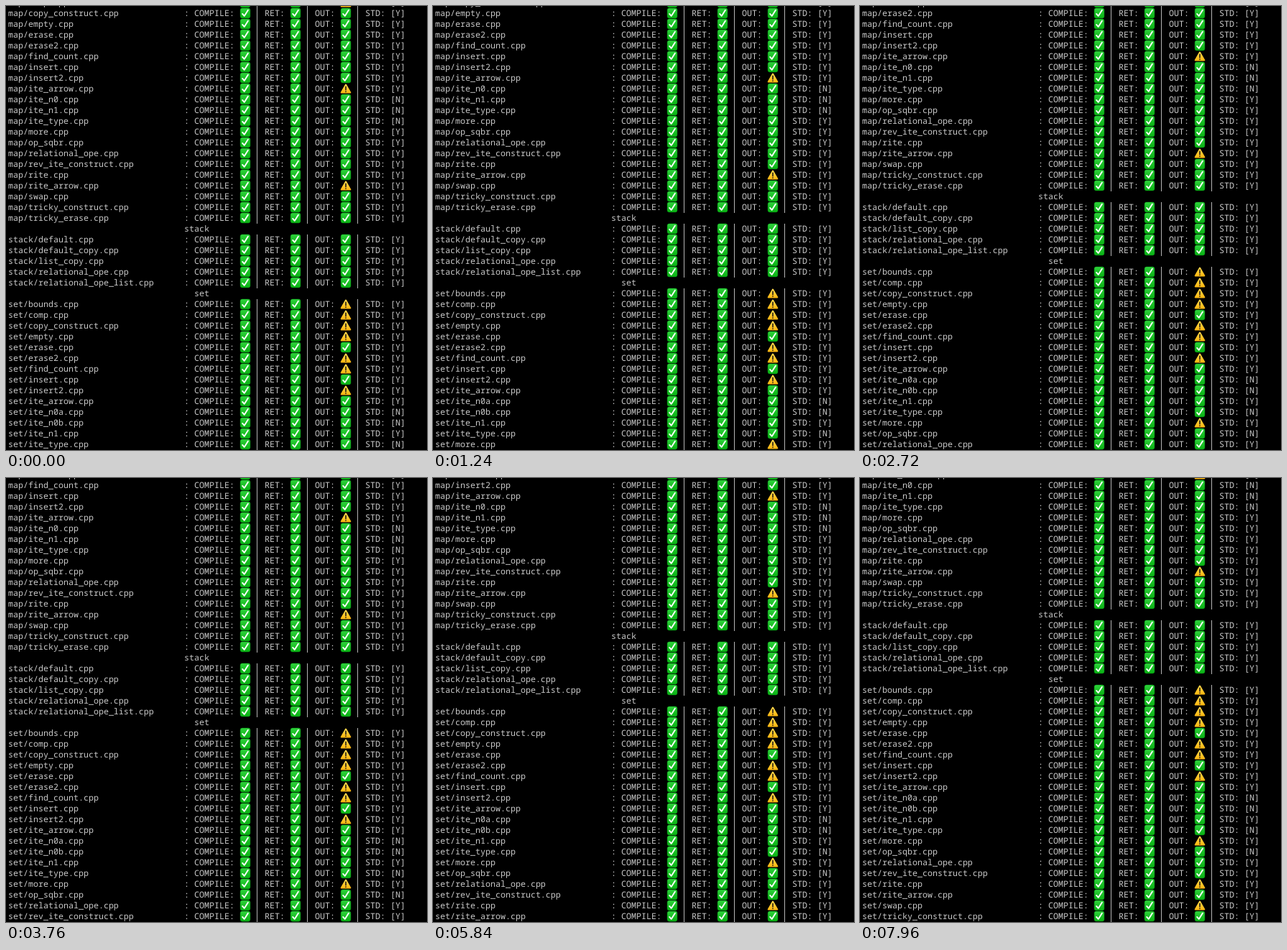
These frames come from a looping animation (586 px wide and 618 px high, 8 s). An HTML page:

```html
<!DOCTYPE html>
<html lang="en">
<head>
<meta charset="utf-8">
<title>Test run</title>
<style>
html, body { margin: 0; width: 100%; height: 100%; overflow: hidden; background: #000; }
svg { display: block; }
text {
  font: 11.667px "Noto Sans Mono", "DejaVu Sans Mono", monospace;
  fill: #c9c9c9;
  text-rendering: geometricPrecision;
}
</style>
</head>
<body>
<svg width="586" height="618" viewBox="0 0 586 618">
  <defs>
    <linearGradient id="green" x2="0" y2="1">
      <stop offset="0" stop-color="#2fd23c"/>
      <stop offset="1" stop-color="#08b012"/>
    </linearGradient>
    <linearGradient id="amber" x2="0" y2="1">
      <stop offset="0" stop-color="#ffd84a"/>
      <stop offset="1" stop-color="#fdb813"/>
    </linearGradient>
    <g id="ok">
      <rect x="-6.9" y="-6.9" width="13.8" height="13.8" rx="2.6" fill="url(#green)" stroke="#0b9a18" stroke-width=".5"/>
      <path d="M-3.9 .9L-1.3 3.9L3.9-4.2" fill="none" stroke="#fff" stroke-width="1.9" stroke-linecap="round" stroke-linejoin="round"/>
    </g>
    <g id="warn">
      <path d="M0-5.5L6.3 5.4H-6.3Z" fill="url(#amber)" stroke="url(#amber)" stroke-width="2" stroke-linejoin="round"/>
      <path d="M0-2.6V1.7M0 4.2V4.3" stroke="#2b2418" stroke-width="1.7" stroke-linecap="round"/>
    </g>
  </defs>
  <g id="log"></g>
</svg>
<script>
const PITCH = 15, CELL = 7, LEFT = 3, LOOP = 8000;
const scrollTimes = [760, 1720, 2720, 3760, 4760, 5840, 6920, 7960];

// "!" marks a warning in OUT, "-" marks STD: [N]
const suites = {
  map: "comp! copy_construct empty erase erase2 find_count insert insert2 ite_arrow! ite_n0- ite_n1- ite_type- " +
    "more op_sqbr relational_ope rev_ite_construct rite rite_arrow! swap tricky_construct tricky_erase",
  stack: "default default_copy list_copy relational_ope relational_ope_list",
  set: "bounds! comp! copy_construct! empty! erase erase2! find_count! insert insert2! ite_arrow ite_n0a- ite_n0b- " +
    "ite_n1 ite_type- more! op_sqbr- relational_ope rev_ite_construct rite! rite_arrow swap! tricky_construct"
};
const headerColumn = { stack: 35, set: 37 };

const log = document.getElementById("log");
let y = 10 - PITCH;

function add(tag, attrs, text = "") {
  const el = document.createElementNS("http://www.w3.org/2000/svg", tag);
  for (const key in attrs) el.setAttribute(key, attrs[key]);
  el.textContent = text;
  log.append(el);
}
const write = (column, text) => add("text", { x: LEFT + column * CELL, y: y + 4 }, text);
const icon = (name, column) =>
  add("use", { href: "#" + name, transform: `translate(${LEFT + column * CELL + 8} ${y})` });
const bar = column =>
  add("rect", { x: LEFT + column * CELL + 3, y: y - 7, width: 1, height: PITCH, fill: "#b4b4b4" });

function addTest(suite, entry) {
  write(0, `${suite}/${entry.replace(/[!-]/, "")}.cpp`);
  write(35, ": COMPILE:");
  write(51, "RET:");
  write(61, "OUT:");
  write(71, `STD: [${entry.endsWith("-") ? "N" : "Y"}]`);
  [49, 59, 69].forEach(bar);
  icon("ok", 46);
  icon("ok", 56);
  icon(entry.endsWith("!") ? "warn" : "ok", 66);
  y += PITCH;
}

for (const suite in suites) {
  if (suite in headerColumn) {
    write(headerColumn[suite], suite);
    y += PITCH;
  }
  for (const entry of suites[suite].split(" ")) addTest(suite, entry);
}

const start = performance.now();
function draw(now) {
  const t = Math.max(0, now - start) % LOOP;
  const lines = scrollTimes.filter(s => t >= s).length;
  log.setAttribute("transform", `translate(0 ${-lines * PITCH})`);
  requestAnimationFrame(draw);
}
draw(start);
</script>
</body>
</html>
```
